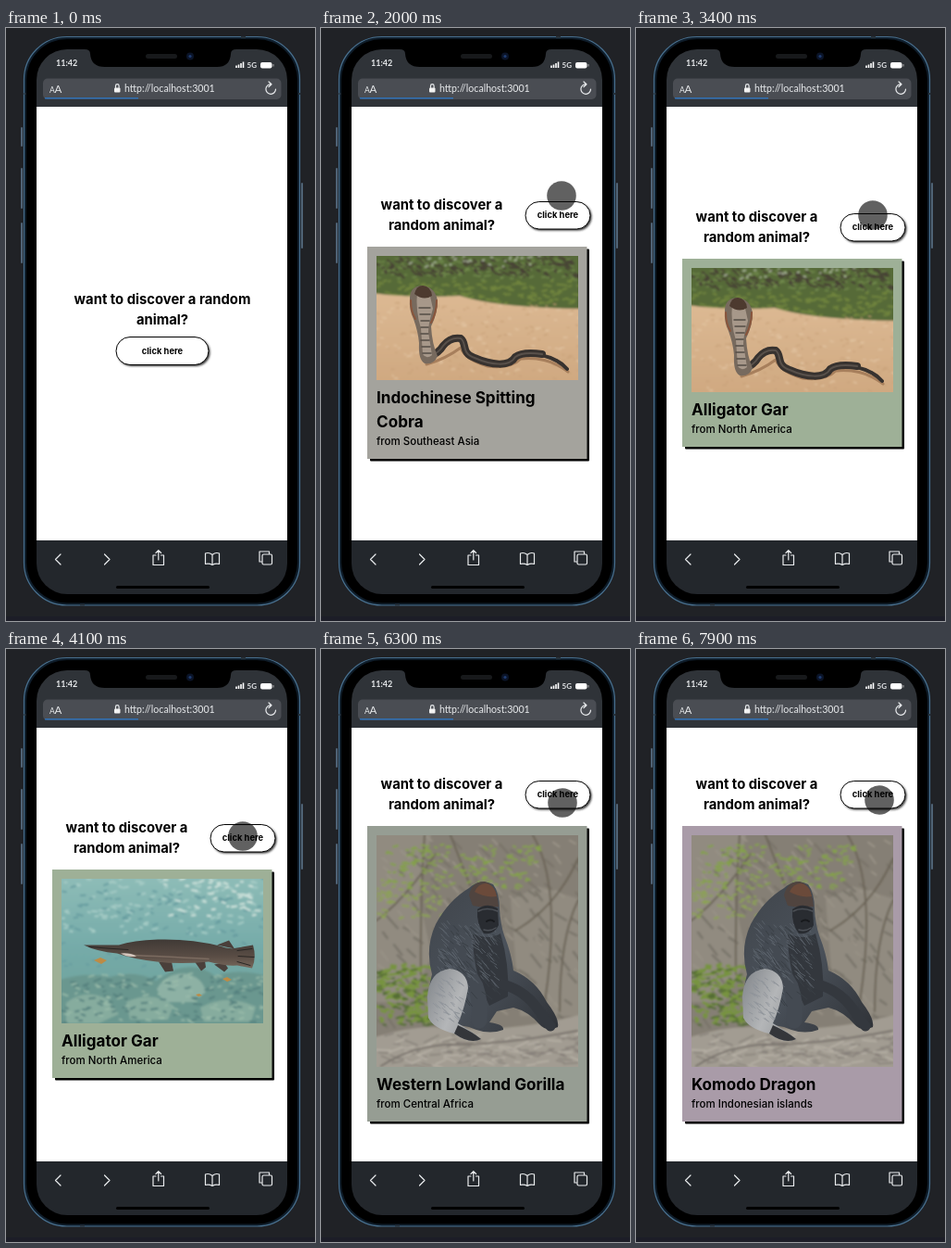
Recreate the animation shown at these times as an HTML page. Size 334x640 px, loop 8000 ms.

```html
<!DOCTYPE html>
<html lang="en">
<head>
<meta charset="utf-8">
<title>Random animal</title>
<style>
  html, body { margin: 0; width: 100%; height: 100%; overflow: hidden; background: #202226; }
  svg { display: block; }
  .page text { font: 700 14.8px Inter, "Open Sans", sans-serif; }
  .page .mid { text-anchor: middle; }
  .page .label { font-size: 9.4px; }
  .page .title { font-size: 17.1px; }
  .page .from { font-size: 11.5px; font-weight: 500; }
  .chrome text { font-family: Lato, sans-serif; fill: #e8eaec; }
  .icon { fill: none; stroke: #e9ebed; stroke-width: 1.2; stroke-linecap: round; stroke-linejoin: round; }
</style>
</head>
<body>
<svg id="stage" width="334" height="640" viewBox="0 0 334 640">
  <defs>
    <linearGradient id="water" x2="0" y2="1">
      <stop offset="0" stop-color="#8fbdb8"/><stop offset=".5" stop-color="#74aaa8"/><stop offset="1" stop-color="#6f9f96"/>
    </linearGradient>
    <linearGradient id="garSkin" x2="0" y2="1">
      <stop offset="0" stop-color="#3f3935"/><stop offset=".6" stop-color="#5a4d45"/><stop offset="1" stop-color="#77685c"/>
    </linearGradient>
    <linearGradient id="sand" x2="0" y2="1">
      <stop offset="0" stop-color="#dcb993"/><stop offset="1" stop-color="#cfa880"/>
    </linearGradient>
    <linearGradient id="fur" x2="1" y2="1">
      <stop offset="0" stop-color="#3f444a"/><stop offset=".5" stop-color="#4b525b"/><stop offset="1" stop-color="#2f3237"/>
    </linearGradient>
    <linearGradient id="silver" x2="1" y2=".6">
      <stop offset="0" stop-color="#7f8388"/><stop offset=".6" stop-color="#b4b6b8"/><stop offset="1" stop-color="#999c9f"/>
    </linearGradient>
    <filter id="soft" x="-10%" y="-20%" width="120%" height="150%"><feGaussianBlur stdDeviation="1"/></filter>
    <filter id="edge" x="-5%" y="-5%" width="110%" height="110%"><feGaussianBlur stdDeviation=".4"/></filter>
    <filter id="haze" x="-5%" y="-5%" width="110%" height="110%"><feGaussianBlur stdDeviation=".8"/></filter>
    <clipPath id="screen"><rect x="33" y="23" width="271" height="588" rx="33"/></clipPath>
  </defs>

  <rect width="334" height="640" fill="#202226"/>
  <rect y="635" width="334" height="5" fill="#1c1d27"/>
  <g fill="#506477">
    <rect x="16" y="107" width="2" height="21" rx="1"/>
    <rect x="16" y="151" width="2" height="44" rx="1"/>
    <rect x="16" y="210" width="2" height="44" rx="1"/>
    <rect x="319" y="167" width="2" height="71" rx="1"/>
  </g>
  <rect x="19.5" y="9.5" width="298" height="613.5" rx="46" fill="#0f1d2a" stroke="#48708f" stroke-width="1.2"/>
  <rect x="22" y="12" width="293" height="608.5" rx="44" fill="#000"/>

  <g clip-path="url(#screen)">
    <rect x="33" y="23" width="272" height="62" fill="#2f3338"/>
    <rect x="33" y="85" width="272" height="468" fill="#fff"/>
    <g class="page">
      <g id="intro">
        <text class="mid" x="169" y="298">want to discover a random</text>
        <text class="mid" x="169" y="320">animal?</text>
        <g id="bigButton"></g>
      </g>
      <g id="result">
        <text class="mid" x="130.5" y="-40.5">want to discover a</text>
        <text class="mid" x="130.5" y="-18">random animal?</text>
        <g id="smallButton"></g>
        <rect id="shadow" x="53" y="2.500" width="237" rx="1" filter="url(#edge)"/>
        <rect id="card" x="50" width="237.500"/>
        <g id="photos"></g>
        <text id="title1" class="title" x="60"></text>
        <text id="title2" class="title" x="60"></text>
        <text id="from" class="from" x="60"></text>
      </g>
    </g>
    <circle id="cursor" r="15.800" opacity=".62"/>
    <rect x="33" y="553" width="272" height="58" fill="#23272c"/>
  </g>

  <g class="chrome">
    <path d="M85 23Q91 23 91 28Q92 42 107 42H228Q242 42 243 28Q243 23 249 23Z"/>
    <rect x="151" y="28" width="34" height="5" rx="2.5" fill="#17191b"/>
    <circle cx="199" cy="30.500" r="4" fill="#0b1428"/>
    <circle cx="199" cy="30.500" r="1.600" fill="#1f3c70"/>
    <text x="54" y="41" font-size="9" font-weight="700">11:42</text>
    <path d="M249 43v-2.500M251.500 43v-3.500M254 43v-5M256.500 43v-6.500" stroke="#fff" stroke-width="1.600"/>
    <text x="260.500" y="42.500" font-size="8" font-weight="700">5G</text>
    <rect x="275" y="37" width="12.500" height="6.500" rx="2" fill="#fff"/>
    <path d="M289 39v2.500" stroke="#aaa" stroke-width="1"/>
    <rect x="40" y="54.500" width="257.500" height="22.500" rx="5" fill="#4a4d53"/>
    <path d="M42 75.800H143" stroke="#2f70b5" stroke-width="1.600"/>
    <text x="47" y="69.500" font-size="8.500">A</text>
    <text x="52.500" y="69.500" font-size="11.500">A</text>
    <rect x="117" y="64.500" width="6.500" height="5" rx="1" fill="#f2f2f2"/>
    <path class="icon" d="M118.500 64.500v-2a1.800 1.800 0 0 1 3.600 0v2"/>
    <text x="128" y="69.300" font-size="10.600">http://localhost:3001</text>
    <path class="icon" d="M291.500 66a5.300 5.300 0 1 1-5-5.300M284 58l3 2.700-3 2.800"/>
    <path class="icon" d="M59 568l-5.500 5.500L59 579M106.500 568l5.500 5.500-5.500 5.500"/>
    <path class="icon" d="M162 569h-3v10.500h11.500V569h-3M164.800 574v-10M162 566.500l2.800-2.800 2.800 2.800"/>
    <path class="icon" d="M223 568.500q-3.500-3-7.500-1.500v11.500q4-1 7.500 1 3.500-2 7.500-1V567q-4-1.500-7.500 1.500v11"/>
    <path class="icon" d="M276.500 576h-2.500v-11h10.500v2.500"/>
    <rect class="icon" x="277" y="568" width="10.500" height="11" rx="1.500"/>
    <rect x="119" y="602" width="101" height="3" rx="1.500"/>
    <path d="M254 10h5M80 622.500h5M19.500 71h2M316 71h2" stroke="#26313a" stroke-width="2"/>
  </g>
</svg>

<script>
const LOOP = 8000;
const $ = id => document.getElementById(id);
const set = (el, attrs) => { for (const k in attrs) el.setAttribute(k, attrs[k]); };

function seeded(seed) {
  return () => (seed = (seed * 16807) % 2147483647) / 2147483647;
}

// Scatters short strokes over a box to suggest texture.
function specks(seed, count, [x, y, w, h], color, width = 1.5, length = 3, slope = 0) {
  const rnd = seeded(seed * 7919);
  let d = '';
  for (let i = 0; i < count; i++) {
    const px = x + rnd() * w, py = y + rnd() * h, len = length * (.4 + rnd());
    d += `M${px.toFixed(1)} ${py.toFixed(1)}l${len.toFixed(1)} ${((rnd() - .5) * len + slope * len).toFixed(1)}`;
  }
  return line(d, color, width);
}
const fill = (d, color) => `<path d="${d}" fill="${color}"/>`;
const line = (d, color, width) =>
  `<path d="${d}" fill="none" stroke="${color}" stroke-width="${width}" stroke-linecap="round" stroke-linejoin="round"/>`;
const hazy = content => `<g filter="url(#haze)">${content}</g>`;

function button(x, y, w, h) {
  const box = `width="${w}" height="${h}" rx="${h / 2}"`;
  return `<rect x="${x + 1.5}" y="${y + 1.5}" ${box} fill="#333" filter="url(#soft)"/>
    <rect x="${x}" y="${y}" ${box} fill="#fff" stroke="#000"/>
    <text class="mid label" x="${x + w / 2}" y="${y + h / 2 + 3}">click here</text>`;
}

function cobraPhoto() {
  const body = 'M56 110Q68 104 72 97Q80 87 91 89C98 94 91 105 106 110C124 118 144 120 150 109Q158 103 179 106';
  const scene = fill('M-5 -5H223V60H-5Z', '#566a38')
    + specks(1, 130, [0, 0, 218, 20], '#463f34', 2, 5, .6)
    + specks(2, 110, [0, 2, 218, 24], '#728b4d', 1.5, 3)
    + specks(3, 150, [0, 26, 218, 26], '#71853d', 2, 4)
    + specks(4, 30, [25, 0, 150, 12], '#b5c0a5', 1.5, 2)
    + fill('M-5 40Q40 46 90 43Q130 56 223 57V139H-5Z', 'url(#sand)')
    + specks(5, 120, [0, 50, 218, 82], '#c7a078', 1.2, 3)
    + specks(6, 90, [0, 48, 218, 84], '#e4c7a5', 1.2, 3);
  return hazy(scene)
    + line('M54 117Q75 111 91 99Q96 112 120 119Q145 122 156 111Q185 108 207 125', '#a77f5c', 3)
    + line(body, '#37322f', 8)
    + line('M155 106Q190 104 206 122', '#37322f', 4)
    + line(body, '#58504a', 2)
    + fill('M36 46Q36 33 49 32Q63 33 66 48Q66 62 59 76Q60 95 66 108Q62 118 52 116Q45 112 46 94Q45 82 40 68Q35 58 36 46Z', '#776a5e')
    + fill('M44 38Q50 34 57 39L61 57Q56 73 56 82L60 107Q54 112 50 106L48 78Q42 60 44 38Z', '#a7988a')
    + fill('M41 41Q43 32 50 32Q59 33 60 43Q51 49 41 41Z', '#4d3a2f')
    + line('M46 56h12M47 63h11M48 70h9M48 77h8M48 84h8M48 91h9M49 98h9M50 105h9', '#544c46', 1.5)
    + line('M37 48Q37 60 42 68M65 48Q65 61 59 72', '#8a553b', 2);
}

function garPhoto() {
  const scene = fill('M-5 -5H223V161H-5Z', 'url(#water)')
    + specks(11, 110, [0, 0, 218, 60], '#a6ccc6', 2, 4)
    + specks(12, 100, [0, 0, 218, 95], '#679da0', 2, 4)
    + specks(13, 45, [110, 0, 100, 40], '#cfe3dc', 2, 4)
    + fill('M-5 110Q25 100 52 106Q80 98 102 110L122 98Q148 90 166 105Q190 96 223 105V161H-5Z', '#6a978f')
    + fill('M103 119Q112 103 132 102Q152 105 156 122L143 133H110Z', '#8db1a4')
    + fill('M5 134Q25 118 50 130L62 146L40 156H5ZM70 133Q98 120 121 137L115 152H74ZM150 139Q179 123 210 138L205 154H154Z', '#86ac9e')
    + specks(14, 90, [0, 105, 218, 50], '#54807e', 2, 5)
    + specks(15, 90, [0, 102, 218, 52], '#9bbdab', 1.5, 4);
  const fish = fill('M105 88L112 99L121 98L119 88ZM144 88L151 98L156 94L155 87ZM165 91L176 99L180 95L176 89ZM168 70L181 65L187 74Z', '#4a403b')
    + fill('M24 70Q42 70 62 70Q77 65 104 64Q140 63 171 71Q181 75 190 73L207 70Q211 84 206 95L190 92Q177 93 159 88Q128 91 103 88Q77 85 60 79Q38 77 24 70Z', 'url(#garSkin)')
    + line('M190 76L206 74M191 82L208 83M190 88L204 92M30 72Q53 74 72 75', '#292624', 1)
    + line('M75 81Q105 82 159 85', '#7b6b60', 1.5)
    + fill('M64 79Q74 78 81 82Q72 84 64 79Z', '#d4c6bd');
  return hazy(scene)
    + fill('M35 88l7-3 7 3-6 4zM174 108l5-2 5 3-5 2zM145 125l4-1 3 2-4 1z', '#bd8b45')
    + `<g transform="translate(0 1.5)">${fish}</g>`;
}

function gorillaPhoto() {
  const scene = fill('M-5 -5H223V255H-5Z', '#857f74')
    + fill('M-5 -5H60L45 65L60 130L35 180H-5ZM145 70L175 55L223 70V195H155Z', '#918b80')
    + specks(21, 100, [0, 0, 218, 200], '#79746a', 2.5, 9, 1)
    + specks(22, 70, [0, 0, 218, 200], '#989286', 2, 7, 1)
    + line('M52 0Q47 70 48 150M80 0L101 54M0 92Q30 70 64 20M218 70Q198 110 198 190M169 0Q201 54 182 180M150 103Q194 78 218 25', '#6b6457', 2)
    + specks(23, 150, [10, 10, 165, 48], '#84a04a', 2, 4)
    + specks(24, 70, [0, 45, 70, 45], '#8ca253', 2, 3)
    + specks(25, 150, [0, 140, 60, 63], '#77933f', 3, 4)
    + specks(26, 75, [0, 145, 60, 60], '#556d35', 2, 4)
    + fill('M-5 219Q31 207 62 207Q105 211 137 208Q178 205 223 193V255H-5Z', '#a29c92')
    + specks(27, 70, [0, 215, 218, 34], '#87817a', 1.5, 12)
    + specks(28, 60, [0, 215, 218, 34], '#b8b2a7', 1.5, 11)
    + line('M5 249Q45 223 95 226Q150 224 217 211', '#77716a', 2);
  return hazy(scene)
    + fill('M100 57Q112 46 126 53Q133 62 133 80Q134 96 138 108Q146 128 148 146Q172 156 184 180Q198 198 196 207Q184 213 176 204Q164 190 148 186L130 190L122 202Q138 204 137 210Q123 215 108 210L100 207L62 200Q52 180 60 150Q52 122 64 96Q78 70 100 57Z', 'url(#fur)')
    + fill('M104 106Q122 114 134 106Q144 140 142 174L122 184Q104 150 104 106Z', '#33373d')
    + line('M80 105Q92 140 107 163Q113 180 111 200', '#444a52', 17)
    + line('M132 160Q158 165 174 187L188 206', '#34383e', 11)
    + specks(29, 130, [66, 92, 62, 72], '#5d656e', .8, 6, 1)
    + specks(30, 60, [68, 95, 60, 82], '#393f45', 1, 6, 1)
    + fill('M55 174Q57 147 79 144Q98 146 99 165Q95 188 88 203Q105 213 113 220Q100 226 84 214Q62 209 56 197Z', 'url(#silver)')
    + specks(31, 50, [61, 154, 30, 45], '#8d9298', .8, 5, .8)
    + fill('M88 205Q105 213 113 220Q101 226 84 214Z', '#34363a')
    + fill('M100 65Q103 50 117 50Q130 53 132 77Q118 79 104 76Z', '#50443f')
    + fill('M106 61Q110 52 119 52Q128 54 130 66Q118 68 106 61Z', '#6b4a3a')
    + fill('M109 80Q119 72 131 79L132 97Q127 108 116 106Q108 96 109 80Z', '#292c31')
    + line('M110 82Q119 77 131 82M116 102Q123 104 129 100', '#4c5056', 1.5)
    + line('M119 93q4-3 8 0', '#17191c', 2);
}

const photos = {
  none: { height: 0, draw: () => '' },
  cobra: { height: 134, draw: cobraPhoto },
  gar: { height: 156, draw: garPhoto },
  gorilla: { height: 250, draw: gorillaPhoto }
};
const cobra = { title: ['Indochinese Spitting', 'Cobra'], from: 'Southeast Asia', color: '#a4a39d' };
const gar = { title: ['Alligator Gar'], from: 'North America', color: '#9eb097' };
const gorilla = { title: ['Western Lowland Gorilla'], from: 'Central Africa', color: '#969d93' };
const komodo = { title: ['Komodo Dragon'], from: 'Indonesian islands', color: '#a99ba8' };

// The text arrives first; its photo follows once loaded.
const timeline = [
  { at: 1000, animal: cobra, photo: 'none' },
  { at: 1300, animal: cobra, photo: 'cobra' },
  { at: 3100, animal: gar, photo: 'cobra' },
  { at: 3600, animal: gar, photo: 'gar' },
  { at: 5100, animal: gorilla, photo: 'gar' },
  { at: 5800, animal: gorilla, photo: 'gorilla' },
  { at: 7300, animal: komodo, photo: 'gorilla' }
];
const cursorPath = [
  [300, 190, 450], [700, 171, 350], [1300, 171, 350], [1900, 260, 181], [2300, 260, 181],
  [2700, 256, 202], [6100, 256, 202], [6300, 261, 166], [6500, 263, 163], [8000, 263, 163]
];

$('bigButton').innerHTML = button(119, 333.5, 100, 30);
$('smallButton').innerHTML = button(221, -48.5, 70, 29.5);
for (const name in photos) {
  const { height, draw } = photos[name];
  $('photos').innerHTML += `<svg id="photo-${name}" x="60" y="10" width="218" height="${height}">${draw()}</svg>`;
}

function cursorAt(t) {
  const i = Math.max(1, cursorPath.findIndex(p => p[0] > t));
  const [t0, x0, y0] = cursorPath[i - 1], [t1, x1, y1] = cursorPath[i];
  const k = Math.max(0, (t - t0) / (t1 - t0)), ease = k * k * (3 - 2 * k);
  return [x0 + (x1 - x0) * ease, y0 + (y1 - y0) * ease];
}

function showResult({ animal, photo }) {
  const { height } = photos[photo];
  const extra = (animal.title.length - 1) * 26;
  const cardHeight = height + 69 + extra;
  const titleY = height + 34.5;
  set($('result'), { transform: `translate(0 ${Math.floor(351 - cardHeight / 2)})` });
  set($('card'), { height: cardHeight, fill: animal.color });
  set($('shadow'), { height: cardHeight });
  for (const name in photos) $('photo-' + name).style.display = name === photo ? '' : 'none';
  $('title1').textContent = animal.title[0];
  $('title2').textContent = animal.title[1] || '';
  $('from').textContent = 'from ' + animal.from;
  set($('title1'), { y: titleY });
  set($('title2'), { y: titleY + 26 });
  set($('from'), { y: titleY + extra + 19.5 });
}

let shown;
function render(t) {
  const state = timeline.filter(s => s.at <= t).pop() || null;
  if (state !== shown) {
    $('intro').style.display = state ? 'none' : '';
    $('result').style.display = state ? '' : 'none';
    if (state) showResult(state);
    shown = state;
  }
  const [cx, cy] = cursorAt(t);
  set($('cursor'), { cx, cy });
  $('cursor').style.display = t < cursorPath[0][0] ? 'none' : '';
}

const start = performance.now();
function frame() {
  render((performance.now() - start) % LOOP);
  requestAnimationFrame(frame);
}
frame();
</script>
</body>
</html>
```
